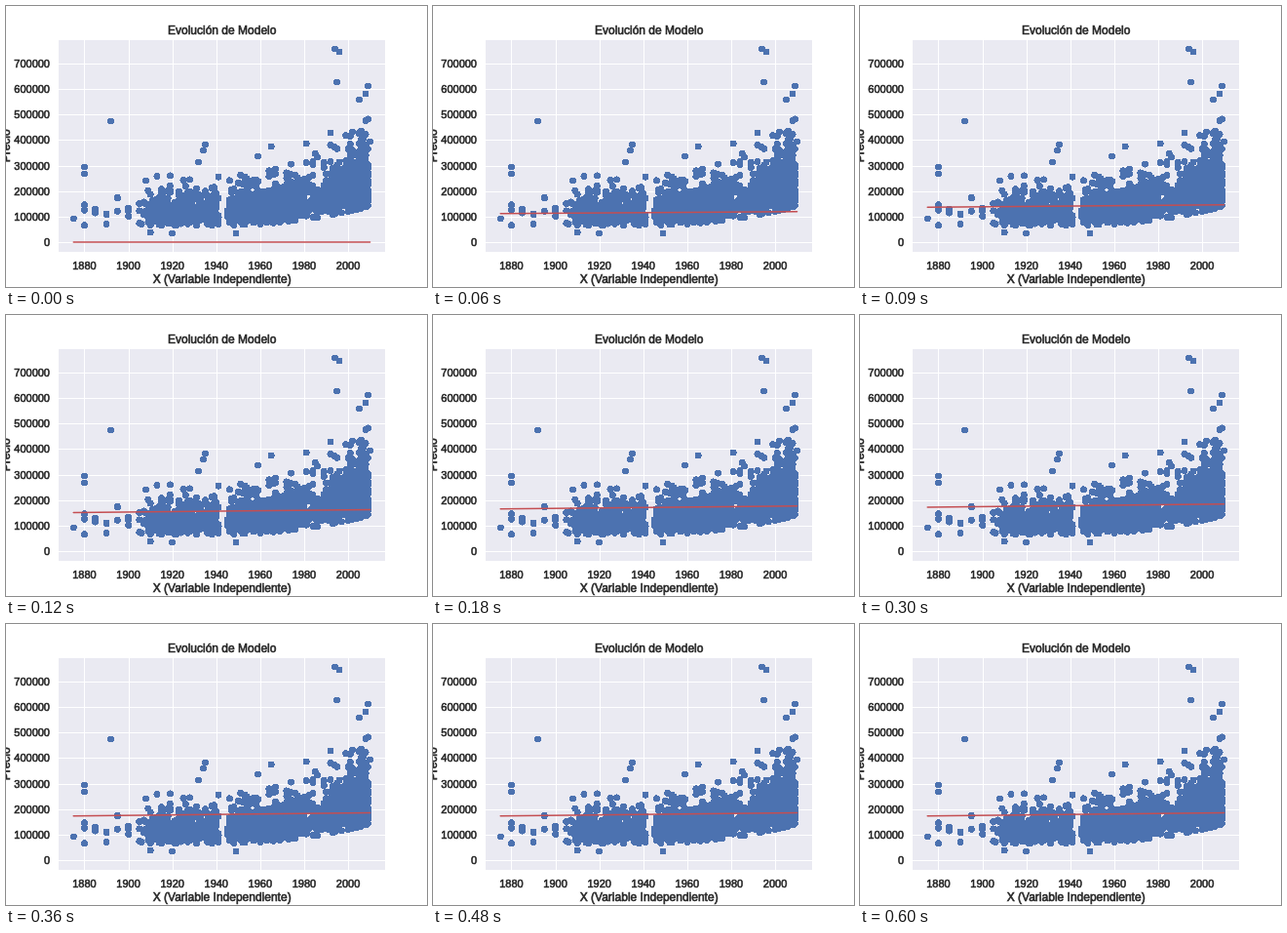
An HTML page that plays this animation: 432 px wide and 288 px high, repeating every 0.96 s.

```html
<!DOCTYPE html>
<html lang="es">
<head>
<meta charset="utf-8">
<title>Evolución de Modelo</title>
<style>
  html, body { margin: 0; width: 100%; height: 100%; overflow: hidden; background: #fff; }
  svg { display: block; }
  text {
    font-family: "Liberation Sans", Arial, sans-serif;
    font-size: 11px; fill: #262626; stroke: #262626; stroke-width: .6px;
  }
  .label { font-size: 12px; }
  circle { fill: #4c72b0; shape-rendering: crispEdges; }
</style>
</head>
<body>
<svg id="chart" width="432" height="288" viewBox="0 0 432 288"></svg>
<script>
const svg = document.getElementById('chart');
const box = { left: 54, right: 389, top: 35, bottom: 252 };
const px = year => 69.22 + (year - 1875) * 2.2545;
const py = price => 242.12 - price * 2.618e-4;
const snap = v => Math.round(v) + .5;

function add(tag, attrs, text) {
  const el = document.createElementNS('http://www.w3.org/2000/svg', tag);
  for (const key in attrs) el.setAttribute(key, attrs[key]);
  if (text) el.textContent = text;
  svg.append(el);
  return el;
}

function write(text, x, y, anchor, extra) {
  add('text', { x, y, 'text-anchor': anchor, ...extra }, text);
}

let seed = 41;
function random() {
  seed = (seed * 16807) % 2147483647;
  return seed / 2147483647;
}

function normal() {
  const z = Math.sqrt(-2 * Math.log(random())) * Math.cos(2 * Math.PI * random());
  return Math.max(-2.2, Math.min(2.5, z));
}

// Axes
add('rect', { x: box.left, y: box.top, width: box.right - box.left,
  height: box.bottom - box.top, fill: '#eaeaf2' });
const grid = { stroke: '#fff', 'stroke-width': 1, 'shape-rendering': 'crispEdges' };
for (let year = 1880; year <= 2000; year += 20) {
  const x = snap(px(year));
  add('line', { x1: x, x2: x, y1: box.top, y2: box.bottom, ...grid });
  write(String(year), px(year), 270, 'middle');
}
for (let price = 0; price <= 700000; price += 100000) {
  const y = snap(py(price));
  add('line', { x1: box.left, x2: box.right, y1: y, y2: y, ...grid });
  write(String(price), 45, py(price) + 4, 'end');
}
const label = { class: 'label' };
write('Evolución de Modelo', 221.7, 29, 'middle', label);
write('X (Variable Independiente)', 221.7, 284, 'middle', label);
write('Precio', 0, 0, 'middle', { ...label, transform: 'translate(3.5 143.3) rotate(-90)' });

function dot(year, y) {
  add('circle', { cx: px(year), cy: y, r: 3.5 });
}

// Outlying houses: year and height on the stage
[
  [1875, 218], [1880, 165], [1880, 172], [1892, 118], [1908, 179],
  [1910, 232], [1920, 233], [1932, 160], [1934, 148], [1935, 142],
  [1949, 233], [1959, 154], [1965, 144], [1981, 141], [1992, 130],
  [1994, 44], [1995, 78], [1996, 47], [2005, 96], [2008, 90],
  [2009, 82], [2010, 139]
].forEach(([year, y]) => dot(year, y));

// Houses per year between key years
const density = [
  [1906, 1], [1920, 12], [1930, 8], [1941, 10], [1942, 0], [1944, 0],
  [1945, 7], [1958, 21], [1977, 23], [1984, 8], [1990, 10], [2000, 25],
  [2006, 55], [2009, 32]
];

function houses(year) {
  if (year < 1906) return year % 5 ? 0 : 3;
  const i = density.findIndex(([end]) => end > year);
  if (i < 0) return density.at(-1)[1];
  const [[y0, n0], [y1, n1]] = [density[i - 1], density[i]];
  return (n0 + (n1 - n0) * (year - y0) / (y1 - y0)) * (.5 + random());
}

// Prices spread log-normally around a median that rises after the war
for (let year = 1880; year < 2010; year++) {
  const age = Math.max(0, (year - 1945) / 65);
  const median = 123000 + 108000 * age ** 2;
  const count = Math.round(houses(year));
  for (let k = 0; k < count; k++) {
    const z = normal();
    const spread = z > 0 ? .3 : .28 - .06 * age;
    dot(year, py(median * Math.exp(z * spread)));
  }
}

// Fitted line: the slope approaches its limit by a fixed ratio per step
const fit = add('line', { x1: px(1875), x2: px(2010), stroke: '#c44e52',
  'stroke-width': 1.5, 'stroke-linecap': 'round' });

function draw(now) {
  const t = now % 960;
  const step = t >= 600 ? 20 : Math.min(18, Math.floor(t / 30));
  const slope = 92.4 * (1 - .595 ** step);
  fit.setAttribute('y1', py(slope * 1875));
  fit.setAttribute('y2', py(slope * 2010));
}

const start = performance.now();
function tick() {
  draw(performance.now() - start);
  requestAnimationFrame(tick);
}
draw(0);
requestAnimationFrame(tick);
</script>
</body>
</html>
```
